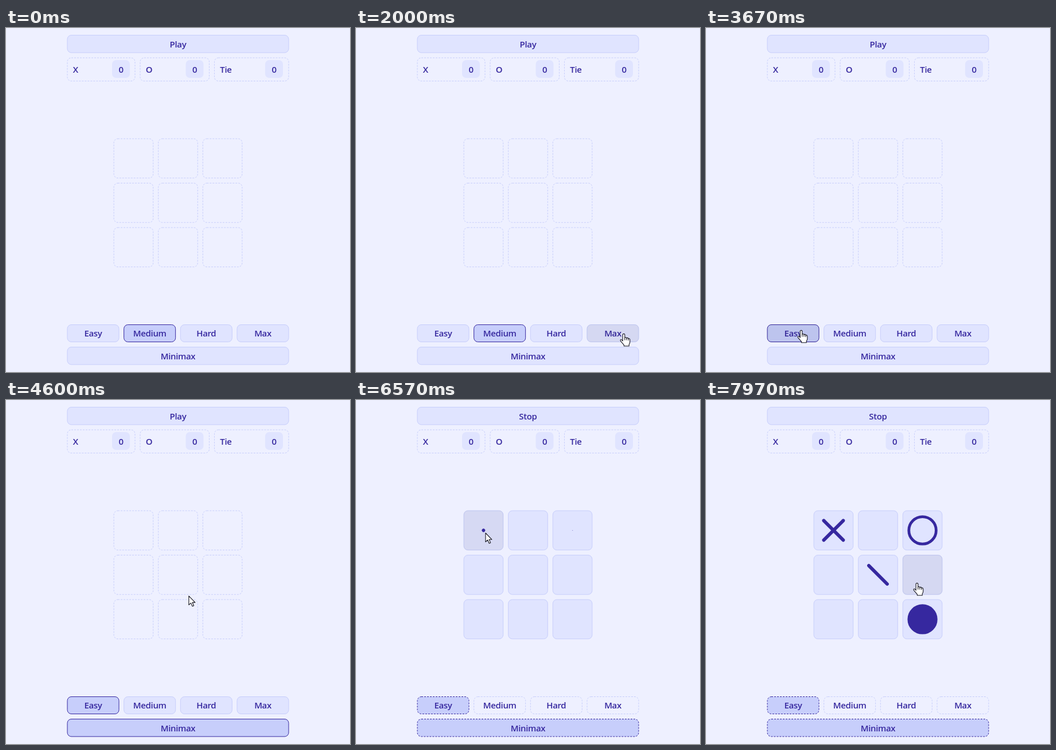
Write an HTML page that moves like this. It is 600 by 600 pixels and loops after 8 s.

```html
<!DOCTYPE html>
<html lang="en">
<head>
<meta charset="utf-8">
<title>Tic-tac-toe</title>
<style>
  html, body { margin: 0; width: 100%; height: 100%; overflow: hidden; background: #eef0ff; }
  svg { display: block; width: 600px; height: 600px; }
  text {
    font: 600 15px "Open Sans", "Noto Sans", sans-serif;
    letter-spacing: -0.35px;
    fill: #36289f;
  }
</style>
</head>
<body>
<svg id="stage" viewBox="0 0 600 600"></svg>
<script>
const LOOP = 8000, STEP = 10, HOVER_MS = 120;
const BG = [238, 240, 255], BASE = [224, 228, 255], EDGE = [199, 206, 251],
      PICKED = [199, 206, 251], INK = [54, 40, 159];
const PICK_EASY = 3500, PICK_ALGO = 4600, START = 5430;

const stage = document.getElementById('stage');
const clamp = v => Math.max(0, Math.min(1, v));
const fade = (t, from, ms = 150) => clamp((t - from) / ms);
const smooth = u => u * u * (3 - 2 * u);
const easeIn = u => u * u;
const easeOut = u => 1 - (1 - u) * (1 - u);
const mix = (a, b, k) => a.map((v, i) => v + (b[i] - v) * k);
const rgb = c => `rgb(${c.map(Math.round)})`;

function set(el, attrs) {
  for (const key in attrs) el.setAttribute(key, attrs[key]);
  return el;
}
function add(tag, attrs, parent = stage) {
  const el = document.createElementNS('http://www.w3.org/2000/svg', tag);
  return parent.appendChild(set(el, attrs));
}
function label(text, x, y, anchor = 'middle') {
  const el = add('text', { x, y, 'text-anchor': anchor });
  el.textContent = text;
  return el;
}
function box(x, y, w, h, attrs) {
  return add('rect', { x: x + 0.5, y: y + 0.5, width: w - 1, height: h - 1, rx: 7, ...attrs });
}

// Controls
const buttons = [];
function button(kind, x, y, w, h, text) {
  const b = { kind, x, y, w, h, rect: box(x, y, w, h), hover: [] };
  if (text) b.text = label(text, x + w / 2, y + h / 2 + 5.9);
  b.shade = add('rect', { x, y, width: w, height: h, rx: 7.5, fill: '#000' });
  buttons.push(b);
  return b;
}
const play = button('play', 106.5, 12, 387, 31.5, 'Play');
['Easy', 'Medium', 'Hard', 'Max'].forEach((name, i) =>
  button(name, 106.5 + i * 98.67, 517, 91, 31, name));
button('algo', 106.5, 556, 387, 31.5, 'Minimax');

// Scores: name, left, width, centre of the count
[['X', 106.5, 119, 200.5], ['O', 233.5, 121.5, 329], ['Tie', 363, 130.5, 467.5]].forEach(([name, x, w, mid]) => {
  box(x, 51.5, w, 41.5, { fill: 'none', stroke: rgb(EDGE), 'stroke-dasharray': '3 2' });
  add('rect', { x: mid - 15.5, y: 56, width: 31, height: 31, rx: 7, fill: rgb(BASE) });
  label(name, x + 10.3, 78, 'start');
  label('0', mid, 78);
});

const cells = Array.from({ length: 9 }, (_, i) =>
  button('cell', 187.6 + (i % 3) * 77.6, 192.6 + Math.floor(i / 3) * 77.5, 69.6, 69.6));

// Moves: cell, time, mark
const moves = [[0, 6570, 'X'], [2, 6570, 'O'], [4, 7800, 'X'], [8, 7800, 'O']].map(([i, at, mark]) => {
  const c = cells[i];
  const group = add('g', {
    transform: `translate(${c.x + c.w / 2} ${c.y + c.h / 2})`,
    fill: 'none', stroke: rgb(INK), 'stroke-linecap': 'round', 'stroke-width': 5.8
  });
  c.takenAt = at;
  const parts = mark === 'X' ? [add('path', {}, group), add('path', {}, group)] : [add('circle', {}, group)];
  return { at, mark, group, parts };
});

function drawMove(m, t) {
  m.group.style.display = t > m.at ? '' : 'none';
  const first = smooth(fade(t, m.at, 200)), second = smooth(fade(t, m.at + 395, 200));
  if (m.mark === 'X') {
    [first, second].forEach((k, i) => {
      const r = 17 * k, s = i ? -1 : 1;
      set(m.parts[i], { d: `M${-r} ${-r * s}L${r} ${r * s}`, opacity: k ? 1 : 0 });
    });
  } else {
    const outer = 26.2 * easeOut(fade(t, m.at, 180)), inner = 21.4 * second;
    set(m.parts[0], { r: (outer + inner) / 2, 'stroke-width': Math.max(0, outer - inner) });
  }
}

// Pointer path: time, x, y, easing into the point
const path = [
  [700, 604, 365], [1070, 578, 434, easeOut], [1270, 578, 434], [1770, 467, 533, smooth],
  [2770, 467, 533], [3000, 166, 530, smooth], [3500, 166, 530], [3530, 166, 527],
  [3720, 166, 527], [4000, 200, 578, smooth], [4599, 200, 578], [4600, 319, 343],
  [5150, 290, 28, easeOut], [5470, 290, 28], [5670, 266, 161, easeIn], [6000, 226, 232, easeOut],
  [6640, 226, 232], [7000, 316, 234, smooth], [7090, 316, 234], [7370, 312, 296, smooth],
  [7800, 312, 296], [7960, 368, 319, easeOut]
];
function pointerAt(t) {
  if (t < path[0][0]) return [640, 365];
  const i = path.findIndex(p => p[0] > t);
  if (i < 0) return path[path.length - 1].slice(1, 3);
  const a = path[i - 1], b = path[i];
  const k = (b[3] || (u => u))((t - a[0]) / (b[0] - a[0]));
  return [a[1] + (b[1] - a[1]) * k, a[2] + (b[2] - a[2]) * k];
}
function isHot(b, t, [x, y]) {
  if (x < b.x || x > b.x + b.w || y < b.y || y > b.y + b.h) return false;
  if (b.kind === 'play') return true;
  if (b.kind === 'cell') return t >= START && !(t >= b.takenAt);
  return t < START;
}

// Hover levels follow from the path, so they are worked out once
for (const b of buttons) {
  let level = 0;
  for (let t = 0; t <= LOOP; t += STEP) {
    const way = isHot(b, t, pointerAt(t)) ? 1 : -1;
    level = t === PICK_ALGO ? 0 : clamp(level + way * STEP / HOVER_MS);
    b.hover.push(level);
  }
}

const pointer = { fill: '#fff', stroke: '#15151f', 'stroke-width': 1.1, 'stroke-linejoin': 'round' };
const arrow = add('path', { ...pointer, d: 'M0 0V15.5L3.6 12.2L6.2 18L8.7 16.9L6.2 11.3H11Z' });
const hand = add('g', pointer);
add('path', {
  d: 'M-1.8 13V2Q-1.8 .4 0 .4T1.8 2V7.6Q2 6.3 3.4 6.5Q4.8 6.7 4.9 8.3Q5.4 7.1 6.7 7.4Q8 7.7 8 9.2' +
     'Q8.6 8.3 9.7 8.8Q10.8 9.3 10.8 11V14.5Q10.8 17 9.2 18.8V21.7H.4V19.8L-5.6 12.8Q-6.4 11.3 -5.2 10.6Q-4.2 10.1 -3.2 11.3Z'
}, hand);
add('path', { fill: 'none', d: 'M1.8 7.6V11.4M4.9 8.3V11.6M8 9.2V12' }, hand);

function pickedAmount(b, t) {
  if (b.kind === 'Easy') return fade(t, PICK_EASY);
  if (b.kind === 'Medium') return 1 - fade(t, PICK_EASY);
  if (b.kind === 'algo') return t >= PICK_ALGO ? 1 : 0;
  return 0;
}
function drawButton(b, t) {
  const started = fade(t, START), picked = pickedAmount(b, t);
  const isCell = b.kind === 'cell';
  const filled = b.kind === 'play' ? 1 : isCell ? started : 1 - started;
  const dashed = b.kind !== 'play' && isCell !== (t >= START);
  set(b.rect, {
    fill: rgb(mix(mix(BG, BASE, filled), PICKED, picked)),
    stroke: rgb(mix(EDGE, INK, picked)),
    'stroke-dasharray': dashed ? '3 2' : 'none'
  });
  set(b.shade, { opacity: 0.05 * b.hover[Math.floor(t / STEP)] });
}

function render(t) {
  buttons.forEach(b => drawButton(b, t));
  play.text.textContent = t < START ? 'Play' : 'Stop';
  moves.forEach(m => drawMove(m, t));
  const at = pointerAt(t), hot = buttons.some(b => isHot(b, t, at));
  for (const el of [arrow, hand]) {
    el.style.display = (el === hand) === hot ? '' : 'none';
    set(el, { transform: `translate(${at})` });
  }
}

const begin = performance.now();
function tick() {
  render((performance.now() - begin) % LOOP);
  requestAnimationFrame(tick);
}
tick();
</script>
</body>
</html>
```
